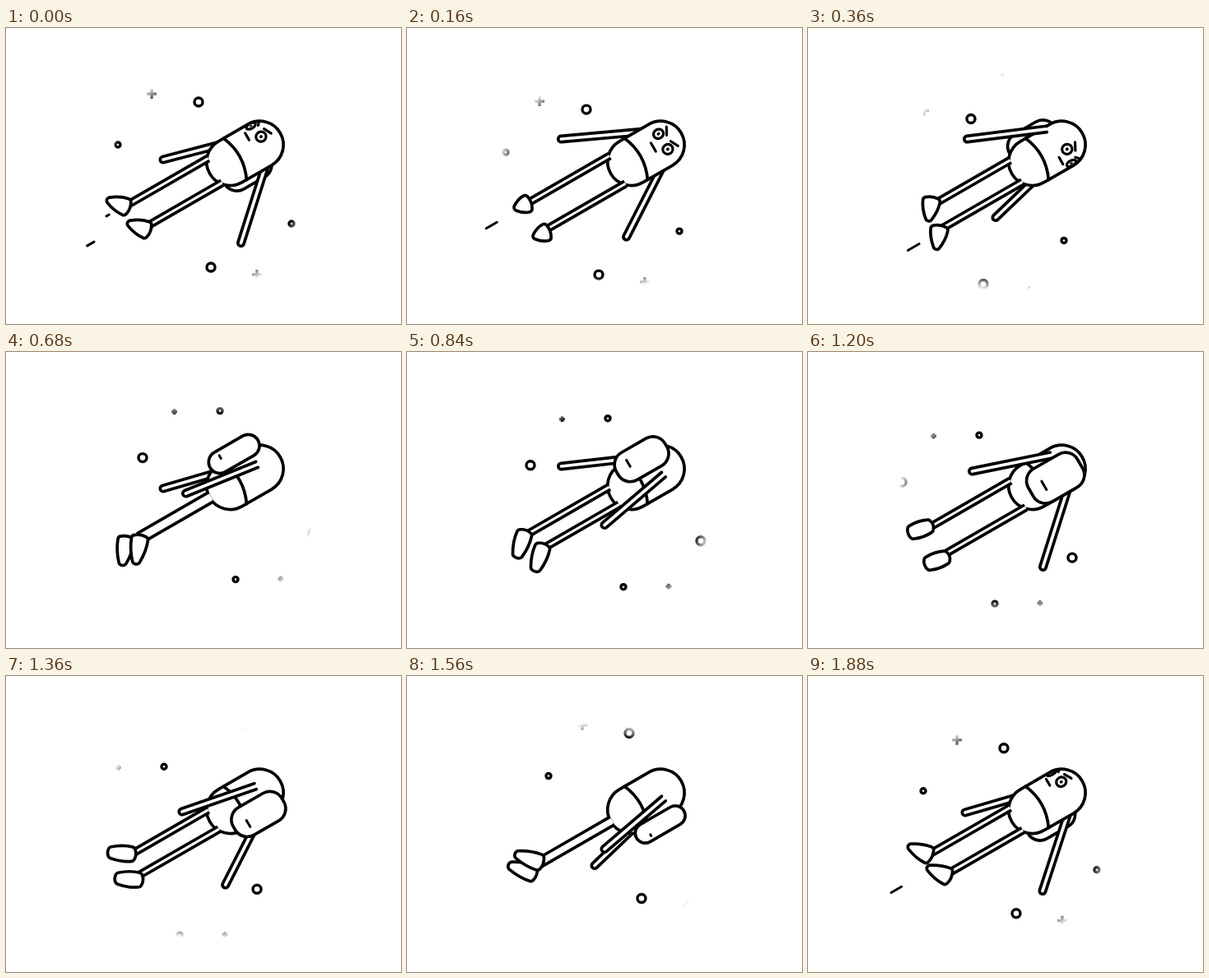
An HTML page with a canvas for the animation above (1920 ms loop, 480 px wide and 360 px high).

```html
<!DOCTYPE html>
<html lang="en">
<head>
<meta charset="utf-8">
<title>Spinning in space</title>
<style>
html, body { margin: 0; width: 100%; height: 100%; overflow: hidden; background: #fff; }
canvas { display: block; width: 480px; height: 360px; }
</style>
</head>
<body>
<canvas id="stage" width="480" height="360"></canvas>
<script>
const ctx = document.getElementById('stage').getContext('2d');
const LOOP = 1920, STEP = 40, INK = 3.7;
const { sin, cos, PI, hypot, atan2, abs, min, max, sqrt } = Math;
const HEAD = { x: 308.3, y: 142.1 };
const TILT = PI / 3;
const R = 28.8, HIP = 41.3;

// Body space: origin at the head centre, y runs towards the feet.
const toBody = ([x, y]) => {
  const dx = x - HEAD.x, dy = y - HEAD.y;
  return [dx * cos(TILT) + dy * sin(TILT), dy * cos(TILT) - dx * sin(TILT)];
};
const turn = (t, zero) => {
  const a = (t - zero) / LOOP * 2 * PI;
  return atan2(sin(a), cos(a));
};
const wrap = t => (t % LOOP + LOOP) % LOOP;

// Smooth periodic curve through [time, value] keys; gain is added per loop.
function curve(times, values, t, gain = 0) {
  const n = times.length;
  const key = i => {
    const lap = Math.floor(i / n), k = i - lap * n;
    return [times[k] + lap * LOOP, values[k] + lap * gain];
  };
  const slope = i => {
    const [a, b] = [key(i), key(i + 1)];
    return (b[1] - a[1]) / (b[0] - a[0]);
  };
  const tangent = i => {
    const h0 = key(i)[0] - key(i - 1)[0], h1 = key(i + 1)[0] - key(i)[0];
    return (slope(i - 1) * h1 + slope(i) * h0) / (h0 + h1);
  };
  let i = n - 1;
  while (times[i] > t) i--;
  const [t0, v0] = key(i), [t1, v1] = key(i + 1);
  const h = t1 - t0, u = (t - t0) / h, w = 1 - u;
  return v0 * (1 + 2 * u) * w * w + v1 * u * u * (3 - 2 * u)
    + h * u * w * (tangent(i) * w - tangent(i + 1) * u);
}
const curve2 = (times, points, t) =>
  [0, 1].map(axis => curve(times, points.map(p => p[axis]), t));

const POSES = [0, 360, 680, 840, 1200, 1560, 1880];
const PACK_TURN = [152, 217, 290, 319, 370, 442, 505];
const LEFT_HEEL = [[145.5, 217.5], [150, 210.5], [162.5, 227.5], [164.5, 238],
  [167, 250], [152.5, 240], [146, 217.5]].map(toBody);
const RIGHT_HEEL = [[170.5, 245.5], [159.5, 245], [146, 229], [142.5, 221.5],
  [147, 212], [160.5, 226.5], [169, 243.5]].map(toBody);
const HAND_TIMES = [0, 120, 360, 480, 680, 840, 1160, 1200, 1560, 1880];
const HAND = [[191, 160], [187.5, 139], [193.5, 135], [199.5, 145], [218.5, 172],
  [240, 210.5], [285, 261.5], [285.5, 261.5], [228, 230.5], [191, 166]].map(toBody);

// x and y at time zero, size, and whether it is a plus
const SPARKS = [
  [234, 90, 5], [328, 33, 3], [249, 291, 5], [347, 238, 3],
  [177, 80, 6, true], [305, 300, 6, true],
  [272.5, 34, 3.4, true], [402, 237.5, 3.4, true]
];
// lane, start distance, start time, duration
const TRAILS = [[-18, 201, -20, 300], [1.5, 200, 1650, 320], [17.7, 200, 220, 300]];

function ink(fill) {
  if (fill) ctx.fill();
  ctx.stroke();
}
function line(x0, y0, x1, y1) {
  ctx.beginPath();
  ctx.moveTo(x0, y0);
  ctx.lineTo(x1, y1);
  ctx.stroke();
}

function sparks(t) {
  ctx.lineCap = 'butt';
  ctx.lineWidth = 3.4;
  for (const [x0, y0, size, plus] of SPARKS) {
    for (const lap of [-1, 0, 1]) {
      const p = t / LOOP + lap, x = x0 - 192 * p, y = y0 + 109 * p;
      if (plus) {
        line(x - size, y, x + size, y);
        line(x, y - size, x, y + size);
      } else {
        ctx.beginPath();
        ctx.arc(x, y, size, 0, 2 * PI);
        ctx.stroke();
      }
    }
  }
  const haze = ctx.createRadialGradient(241, 188, 114, 241, 188, 133.5);
  haze.addColorStop(0, 'rgba(255,255,255,0)');
  haze.addColorStop(1, '#fff');
  ctx.fillStyle = haze;
  ctx.fillRect(0, 0, 480, 360);
}

function trails(t) {
  ctx.lineWidth = 3;
  for (const [x, y, start, span] of TRAILS) {
    const p = wrap(t - start) / span;
    if (p >= 1) continue;
    line(x, y + 43 * max(0, (p - .3) / .7), x, y + 43 * min(1, 1.3 * p));
  }
  ctx.lineWidth = INK;
}

function capsule() {
  ctx.beginPath();
  ctx.arc(0, 0, R, PI, 0);
  ctx.arc(0, HIP, R, 0, PI);
  ctx.closePath();
}

function face(a) {
  ctx.save();
  capsule();
  ctx.clip();
  ctx.lineWidth = 3.2;
  const mouth = 29.5 * sin(a), half = 5.8 * cos(a), my = 9.3 + 2 * sin(a);
  if (half > 0) line(mouth - half, my, mouth + half, my);
  for (const side of [-1, 1]) {
    const e = 1.1 * a + side * .38, depth = cos(e);
    if (depth < .2) continue;
    const x = 29.5 * sin(e), y = 4 - 9 * depth + 3 * sin(a);
    ctx.beginPath();
    ctx.ellipse(x, y, 6.2 * depth, 6.2, 0, 0, 2 * PI);
    ctx.stroke();
    ctx.fillStyle = '#000';
    ctx.beginPath();
    ctx.ellipse(x, y, 2 * depth, 2, 0, 0, 2 * PI);
    ctx.fill();
    const b = e - side * .07, bx = 29.5 * sin(b), bw = 4.8 * cos(b), lift = 2.4 * side;
    line(bx - bw, y - 10.3 + lift, bx + bw, y - 10.3 - lift);
  }
  ctx.restore();
}

function body(a) {
  capsule();
  ink(true);
  ctx.beginPath();
  ctx.moveTo(-R, 34);
  ctx.quadraticCurveTo(0, 21.5, R, 35);
  ctx.stroke();
  face(a);
}

function legs(a, left, right) {
  const spread = 19.5 * cos(a + .09), outer = 5.2, inner = outer - INK;
  const tube = (x0, x1, half, end) => {
    const lo = min(x0, x1) - half, hi = max(x0, x1) + half, mid = (x0 + x1) / 2;
    const top = HIP + sqrt(R * R - mid * mid) - 2;
    ctx.fillRect(lo, top, hi - lo, end - top);
  };
  const merged = abs(spread) < outer;
  for (const [color, half] of [['#000', outer], ['#fff', inner]]) {
    ctx.fillStyle = color;
    if (merged) {
      tube(-spread, spread, half, min(left[1], right[1]));
    } else {
      tube(-spread, -spread, half, left[1]);
      tube(spread, spread, half, right[1]);
    }
  }
}

function foot([x, y], a) {
  const r = 4;
  const dx = 20 * sin(a) + 9 * sin(a) * max(0, cos(a)), dy = 16 - 4.5 * cos(a);
  const len = hypot(dx, dy), back = ((1 - cos(a)) / 2) ** 3;
  const heel = 6.5 - 2.5 * back, toe = 4.5 * back, side = (heel + toe) / 2 + 2.8;
  ctx.save();
  ctx.translate(x, y);
  ctx.rotate(atan2(dy, dx));
  ctx.beginPath();
  ctx.moveTo(0, -heel);
  ctx.quadraticCurveTo(len * .5, -side, len + 1, -toe);
  ctx.quadraticCurveTo(len + 1 + toe * .5, 0, len + 1, toe);
  ctx.quadraticCurveTo(len * .5, side, 0, heel);
  ctx.quadraticCurveTo(-2.5, 0, 0, -heel);
  ctx.closePath();
  ctx.lineWidth = 2 * r + INK;
  ctx.stroke();
  ctx.strokeStyle = '#fff';
  ctx.lineWidth = 2 * r - INK;
  ink(true);
  ctx.restore();
}

function arm(t) {
  const a = turn(t, 750), w = 3.7;
  const [hx, hy] = curve2(HAND_TIMES, HAND, t);
  const dx = 27 * sin(a) - hx, dy = 9 - 9 * cos(a) - hy, len = hypot(dx, dy);
  return {
    front: cos(a) > .25,
    draw() {
      ctx.save();
      ctx.translate(hx, hy);
      ctx.rotate(atan2(dy, dx));
      ctx.beginPath();
      ctx.moveTo(len, -w);
      ctx.lineTo(0, -w);
      ctx.arc(0, 0, w, -PI / 2, PI / 2, true);
      ctx.lineTo(len, w);
      ink(true);
      ctx.restore();
    }
  };
}

function pack(a) {
  const x = 33.3 * sin(a), y = 21 - 9 * cos(a);
  const w = hypot(46.5 * cos(a), 23.5 * sin(a)), h = 66 + 3 * cos(a);
  ctx.beginPath();
  ctx.roundRect(x - w / 2, y - h / 2, w, h, min(w / 2, 17));
  ink(true);
  const half = 6 * cos(a);
  if (half > 0) {
    ctx.lineWidth = 3;
    line(x * 1.17 - half, y + 16.5, x * 1.17 + half, y + 16.5);
    ctx.lineWidth = INK;
  }
}

function draw(t) {
  ctx.setTransform(1, 0, 0, 1, 0, 0);
  ctx.fillStyle = '#fff';
  ctx.fillRect(0, 0, 480, 360);
  ctx.strokeStyle = '#000';
  ctx.lineJoin = 'round';
  sparks(t);

  ctx.translate(HEAD.x, HEAD.y);
  ctx.rotate(TILT);
  ctx.fillStyle = '#fff';
  ctx.lineCap = 'round';
  trails(t);

  const facing = turn(t, 180);
  const packTurn = curve(POSES, PACK_TURN, t, 360) * PI / 180;
  const packFront = cos(packTurn) > 0;
  const arms = [arm(t), arm(wrap(t + 1200))];
  const left = curve2(POSES, LEFT_HEEL, t), right = curve2(POSES, RIGHT_HEEL, t);

  if (!packFront) pack(packTurn);
  arms.filter(a => !a.front).forEach(a => a.draw());
  body(facing);
  legs(facing, left, right);
  const feet = sin(facing) > 0 ? [right, left] : [left, right];
  feet.forEach(f => foot(f, facing));
  arms.filter(a => a.front).forEach(a => a.draw());
  if (packFront) pack(packTurn);
}

function tick() {
  draw(Math.floor(performance.now() / STEP) * STEP % LOOP);
  requestAnimationFrame(tick);
}
tick();
</script>
</body>
</html>
```
